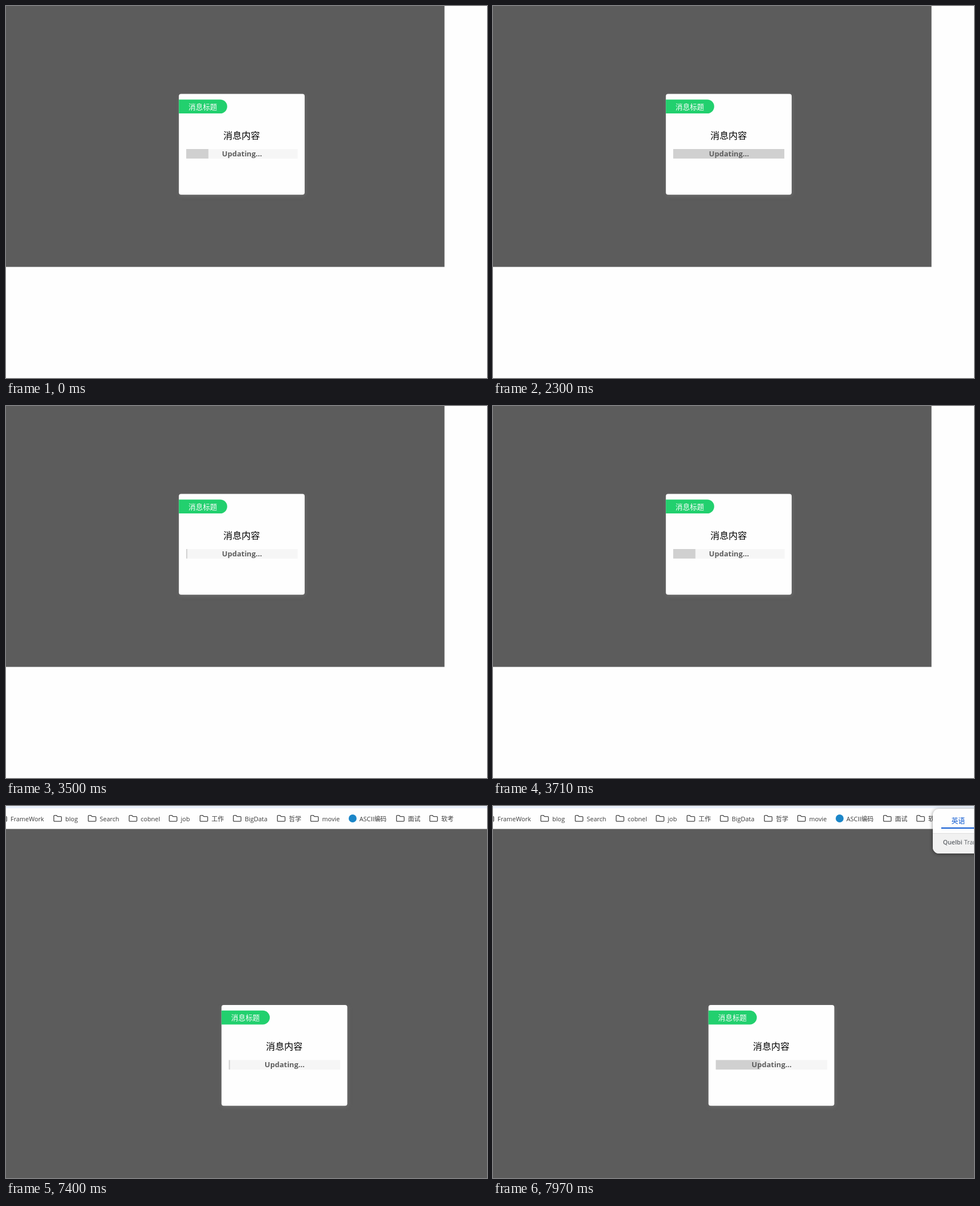
Write an HTML page that moves like this. It is 852 by 658 pixels and loops after 8000 ms.

```html
<!DOCTYPE html>
<html lang="zh-CN">
<head>
<meta charset="utf-8">
<style>
html, body { margin: 0; height: 100%; overflow: hidden; background: #fefefe; }
svg { display: block; width: 852px; height: 658px; font-family: "Open Sans", "Noto Sans CJK SC", "Noto Sans CJK", sans-serif; }
#panel { filter: drop-shadow(1px 2px 3px #6d6d6d); }
#bookmarks { font-size: 11px; fill: #3c3c3c; }
#bookmarks path { fill: none; stroke: #444; stroke-width: 1.3; }
</style>
</head>
<body>
<svg viewBox="0 0 852 658">
  <rect id="backdrop" fill="#5c5c5c"/>

  <g id="card">
    <rect id="panel" x="306.2" y="155.5" width="222.8" height="178.3" rx="4" fill="#fefefe"/>
    <path d="M306.2 165.4h73.3a12.3 12.3 0 0 1 0 24.6h-73.3z" fill="#22d06e"/>
    <text x="323.3" y="183" font-size="12.7" fill="#fff">消息标题</text>
    <text x="385" y="235" font-size="16.2">消息内容</text>
    <rect id="track" x="319.2" y="253" width="197.3" height="16.8" fill="#f6f6f6"/>
    <rect id="bar" x="319.2" y="253" height="16.8" fill="#d0d0d0"/>
    <path id="sunkenBar" d="M320 269.5V259l2-2 58-1 6-3h62l8 5h56l3 3v8.5z" fill="#d6d6d6"/>
    <text x="418" y="266" font-size="13" font-weight="700" fill="#5f5f5f" text-anchor="middle">Updating...</text>
  </g>

  <rect id="shade" width="776.7" height="461.5" fill="#000" opacity=".6"/>

  <g id="browser">
    <rect width="852" height="40.5" fill="#fefefe"/>
    <rect width="852" height="4" fill="#e9f0fb"/>
    <rect y="40" width="852" height="1" fill="#bdbdbd"/>
    <g id="bookmarks"></g>
    <g id="popup">
      <rect x="779" y="5" width="120" height="79" rx="11" fill="#fefefe" style="filter:drop-shadow(0 1px 3px #0007)"/>
      <path d="M779 48h90v36h-79a11 11 0 0 1-11-11z" fill="#f1f1f1"/>
      <path d="M779 48.5h90" stroke="#dedede"/>
      <path d="M794 39h70" stroke="#0b57d0" stroke-width="2"/>
      <text x="812" y="30.5" font-size="12" fill="#0b57d0">英语</text>
      <g font-size="10.8" fill="#5f6368">
        <text x="797" y="67.5" font-weight="600">Quelbi</text>
        <text x="834.5" y="67.5">Translate</text>
      </g>
    </g>
  </g>
</svg>
<script>
const LOOP = 8000, TICK = 30, OFFSET = 20, STEP_WIDTH = 39.35;
const el = id => document.getElementById(id);
const clamp = v => Math.max(0, Math.min(1, v));
const show = (id, on) => el(id).style.display = on ? "" : "none";

const bookmarks = [
  [8, "FrameWork"], [105, "blog"], [166, "Search"], [238.5, "cobnel"], [309.5, "job"], [364, "工作"],
  [423, "BigData"], [501, "哲学"], [560, "movie"], [626, "ASCII编码"], [712, "面试"], [771, "软考"]
];
const folder = "M.7 2.2q0-1.5 1.5-1.5h3.3l1.8 2h5.5q1.5 0 1.5 1.5v5.5q0 1.5-1.5 1.5h-10.6q-1.5 0-1.5-1.5z";
el("bookmarks").innerHTML = bookmarks.map(([x, label]) =>
  (label.startsWith("ASCII")
    ? `<circle cx="614" cy="22" r="7" fill="#1b86c8"/>`
    : `<path d="${folder}" transform="translate(${x - 21} 16)"/>`) +
  `<text x="${x}" y="26.6">${label}</text>`).join("");

// Each step of the bar grows linearly for 200 ms from its start time.
const steps = (t, ...starts) => starts.reduce((sum, s) => sum + clamp((t - s) / 200), 0);

function progress(t) {
  if (t < 500) return 1;
  if (t < 2450) return steps(t, 520, 909, 1286, 1677, 2075);
  if (t < 3500) return 5;
  if (t < 7400) return steps(t, 3490);
  return steps(t, 7390, 7750);
}

function draw() {
  const now = performance.now() % LOOP;
  const t = Math.floor((now + 1 - OFFSET) / TICK) * TICK + OFFSET;
  const dark = t >= 2450 && t < 3500;
  const full = t >= 5330;

  el("backdrop").setAttribute("width", full ? 852 : 776.7);
  el("backdrop").setAttribute("height", full ? 658 : 461.5);
  el("card").setAttribute("transform", full ? "translate(75.5 196.4)" : "");
  el("bar").setAttribute("width", progress(t) * STEP_WIDTH);
  show("track", !dark);
  show("bar", !dark);
  show("sunkenBar", dark);
  show("shade", dark);
  show("browser", full);
  el("popup").style.opacity = clamp((t - 7400) / 200);
  requestAnimationFrame(draw);
}
draw();
</script>
</body>
</html>
```
